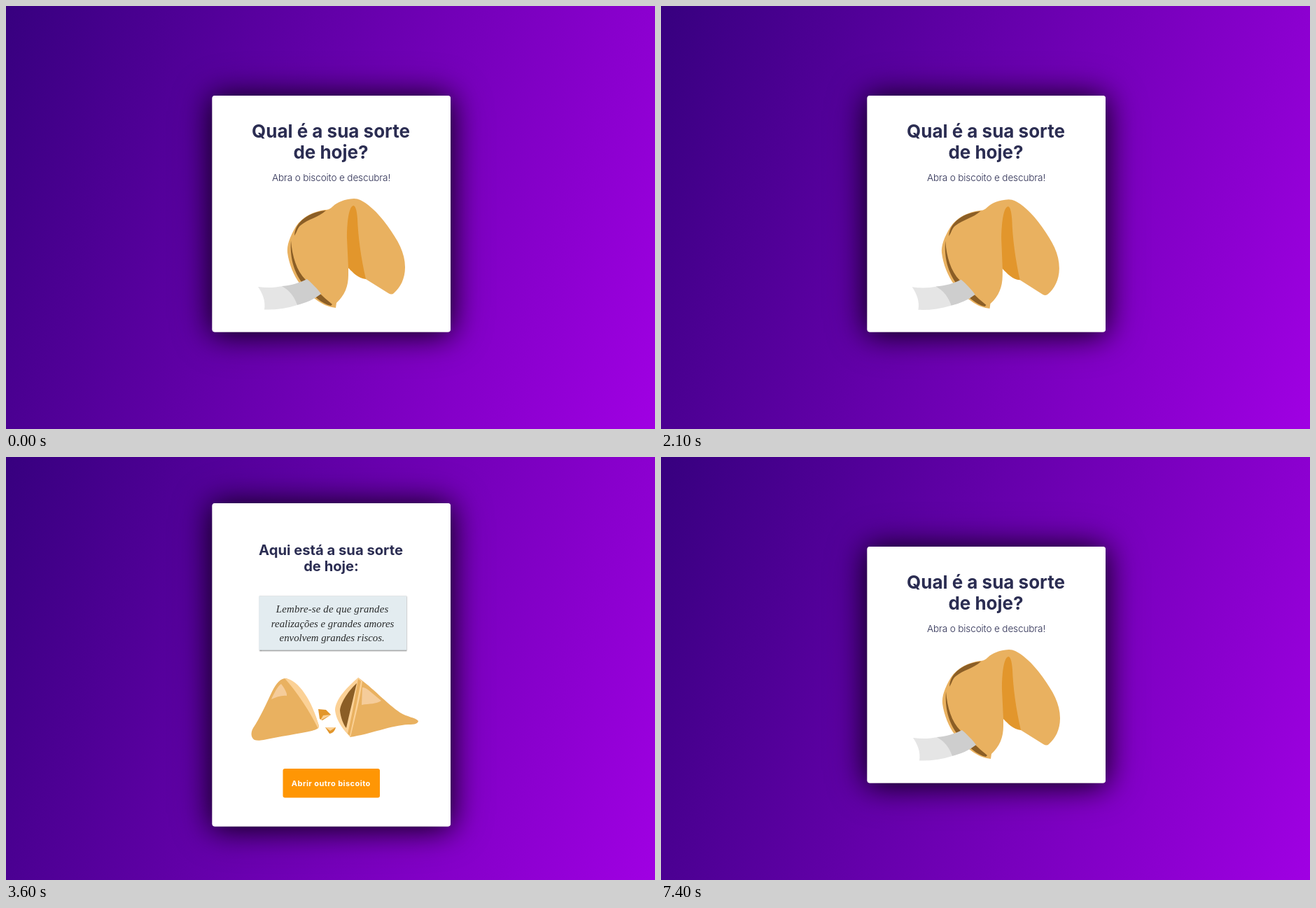
Recreate the animation shown at these times as an HTML page with a canvas. Size 927 by 604 pixels, loop 8000 ms.

```html
<!DOCTYPE html>
<html lang="pt-BR">
<head>
<meta charset="utf-8">
<title>Biscoito da sorte</title>
<style>
  html, body { margin: 0; width: 100%; height: 100%; overflow: hidden; }
  body { background: linear-gradient(109.6deg, #37007f, #a000e3); }
  canvas { display: block; width: 927px; height: 604px; }
</style>
</head>
<body>
<canvas id="stage" width="927" height="604"></canvas>
<script>
const ctx = document.getElementById('stage').getContext('2d');
const LOOP = 8000, STEP = 100;
const SHAKE = 500, OPEN = 2300, HOVER = 7000, RESET = 7400;
const PAPER_START = 2280, PAPER_TIME = 2100;

const SANS = 'Montserrat, Inter, sans-serif';
const SCRIPT = '"Dancing Script", "Liberation Serif", serif';
const INK = '#2b2d52', TAN = '#e9b160', BROWN = '#8b5e26', AMBER = '#e2962c';
const CREAM = '#fbd196', SHINE = '#f5cc9a';

const shape = (color, d) => ({ color, path: new Path2D(d) });

const closedCookie = [
  shape(TAN, `M497 275 C483 276 473 280 467 286 C463 290 460 291 456 291
    C440 293 423 301 414 315 C405 330 401 342 402 352 C404 368 411 385 420 397
    C432 412 450 427 465 430 L471 431 L472 424 C484 413 489 400 489 384 L489 373
    L514 390 L546 410 Q551 413 554 410 C563 402 570 390 570 373
    C570 352 560 335 545 314 C530 293 515 281 506 277 Q502 275 497 275Z`),
  shape(AMBER, `M496 285 C489 287 487 312 487 332 L489 374 C496 381 503 389 514 390
    C507 360 503 330 502 304 C501 291 499 285 496 285Z`),
  shape(BROWN, `M457 292 C434 294 413 307 412 328 C416 322 416 317 421 313
    C432 304 446 302 457 292Z`),
  shape(BROWN, `M407 335 C405 362 413 384 426 399 C438 413 452 426 464 428
    L466 426 C452 415 440 402 428 391 C415 378 409 358 407 335Z`),
  shape('#e5e5e5', `M360 401 C373 403 385 402 395 400 C408 404 413 416 416 427
    C400 432 385 434 369 433.5 C371 422 367 411 360 401Z`),
  shape('#cecece', `M394 400 C408 399 420 395 430 390 C437 396 445 404 450 411
    C440 419 428 424 416 427 C412 415 405 406 394 400Z`)
];

const openCookie = [
  // left half
  shape(TAN, `M400 316 C392 316 386 323 380 335 C372 352 362 374 353 387
    C349 394 350 401 355 404 C358 405 362 405 368 404 C390 399 420 395 437 391
    C443 389 447 388 447 384 C437 351 416 321 400 316Z`),
  shape(CREAM, `M398 316 C418 317 438 350 447 384 L446 388 C433 362 416 336 398 316Z`),
  shape(SHINE, `M379 346 C383 337 388 327 393 324 C397 329 402 337 401 341
    C394 340 386 343 379 346Z`),
  // crumbs
  shape(AMBER, 'M446 360 L457 361 L464 368 L452 376 L448 374Z'),
  shape(CREAM, 'M453 369 L464 368 L449 376Z'),
  shape(AMBER, 'M456 386 L471 386 C470 391 466 395 462 395Z'),
  shape(CREAM, 'M456 386 L471 386 L463 391Z'),
  // right half
  shape(TAN, `M503 315 C522 328 545 353 563 365 C572 371 585 372 589 377
    C588 381 584 382 575 382 C550 383 520 396 491 400Z`),
  shape(CREAM, `M503 315 L509 320 C506 345 498 375 492 400
    C483 391 471 376 470 361 C471 345 488 328 503 315Z`),
  shape(TAN, 'M503 317 L507 320 C502 348 496 375 491 398 L488 395 C495 366 499 340 503 317Z'),
  shape(BROWN, `M501 323 C490 333 478 350 477 362 C478 372 482 382 486 387
    C491 365 497 340 501 323Z`),
  shape(SHINE, 'M509 329 Q513 329 518 333 L536 348 C529 353 519 352 508 354Z')
];

// Standard CSS "ease" curve
function ease(x) {
  if (x <= 0) return 0;
  if (x >= 1) return 1;
  const bez = (u, a, b) => 3 * u * (1 - u) * (1 - u) * a + 3 * u * u * (1 - u) * b + u * u * u;
  let lo = 0, hi = 1;
  for (let i = 0; i < 24; i++) {
    const mid = (lo + hi) / 2;
    if (bez(mid, 0.25, 0.25) < x) lo = mid; else hi = mid;
  }
  return bez(lo, 0.1, 1);
}

function text(str, x, y, font, color, spacing = 0) {
  ctx.font = font;
  ctx.fillStyle = color;
  ctx.letterSpacing = spacing + 'px';
  ctx.textAlign = 'center';
  ctx.fillText(str, x, y);
}

function box(x, y, w, h, r, color) {
  ctx.fillStyle = color;
  ctx.beginPath();
  ctx.roundRect(x, y, w, h, r);
  ctx.fill();
}

function shadowed(blur, dx, dy, color, draw) {
  ctx.save();
  ctx.shadowColor = color;
  ctx.shadowBlur = blur;
  ctx.shadowOffsetX = dx;
  ctx.shadowOffsetY = dy;
  draw();
  ctx.restore();
}

function card(y, h) {
  const draw = () => box(294.5, y, 340.5, h, 4, '#fff');
  shadowed(60, 0, 2, 'rgba(0,0,0,.35)', draw);
  shadowed(40, 0, 2, 'rgba(0,0,0,.8)', draw);
}

function paint(shapes) {
  for (const s of shapes) {
    ctx.fillStyle = s.color;
    ctx.fill(s.path);
  }
}

// x, y, degrees
const poses = [[1, 1, 0], [-1, 1, 0.4], [1, 0, -0.3], [-1, -1, 0.3], [1.9, -1.1, -0.6]];

function closedScene(t) {
  card(128, 337.5);
  const font = 'bold 26px ' + SANS;
  text('Qual é a sua sorte', 464, 188, font, INK);
  text('de hoje?', 464, 218, font, INK);
  text('Abra o biscoito e descubra!', 464.5, 249.5, '300 13.6px "DM Sans", Inter, sans-serif', INK, -0.15);

  ctx.save();
  if (t >= SHAKE && t < OPEN) {
    const [dx, dy, deg] = poses[(t - SHAKE) / STEP % poses.length];
    ctx.translate(465 + dx, 354 + dy);
    ctx.rotate(deg * Math.PI / 180);
    ctx.translate(-465, -354);
  }
  paint(closedCookie);
  ctx.restore();
}

function paper(s) {
  ctx.save();
  ctx.translate(467, 224.5 + 132 * (1 - s));
  ctx.scale(s, s);
  shadowed(1.5, 1, 1, '#777', () => box(-117, -43, 233.5, 85.5, 0, '#e3ecf0'));
  const ink = s < 1 ? 'rgba(0,0,0,.82)' : '#000';
  const font = 'italic 16.4px ' + SCRIPT;
  text('Lembre-se de que grandes', -1, -17, font, ink, 0.2);
  text('realizações e grandes amores', -0.5, 6, font, ink);
  text('envolvem grandes riscos.', -1.5, 29, font, ink);
  ctx.restore();
}

function openScene(t) {
  card(66, 461.5);
  const font = 'bold 20.2px ' + SANS;
  text('Aqui está a sua sorte', 464, 140, font, INK);
  text('de hoje:', 464.5, 163, font, INK);
  paint(openCookie);
  paper(ease((t - PAPER_START) / PAPER_TIME));

  const dim = t < HOVER ? 1 : 1 - 0.1 * ease((t - HOVER + 80) / 300);
  box(395.5, 445, 138.5, 41.5, 3, `rgb(${255 * dim}, ${150 * dim}, ${4 * dim})`);
  text('Abrir outro biscoito', 464.3, 470, 'bold 11px Rubik, Inter, sans-serif', '#fff', 0.45);
}

function frame(now) {
  const t = Math.floor(now % LOOP / STEP) * STEP;
  ctx.clearRect(0, 0, 927, 604);
  if (t >= OPEN && t < RESET) openScene(t);
  else closedScene(t);
  requestAnimationFrame(frame);
}
requestAnimationFrame(frame);
</script>
</body>
</html>
```
